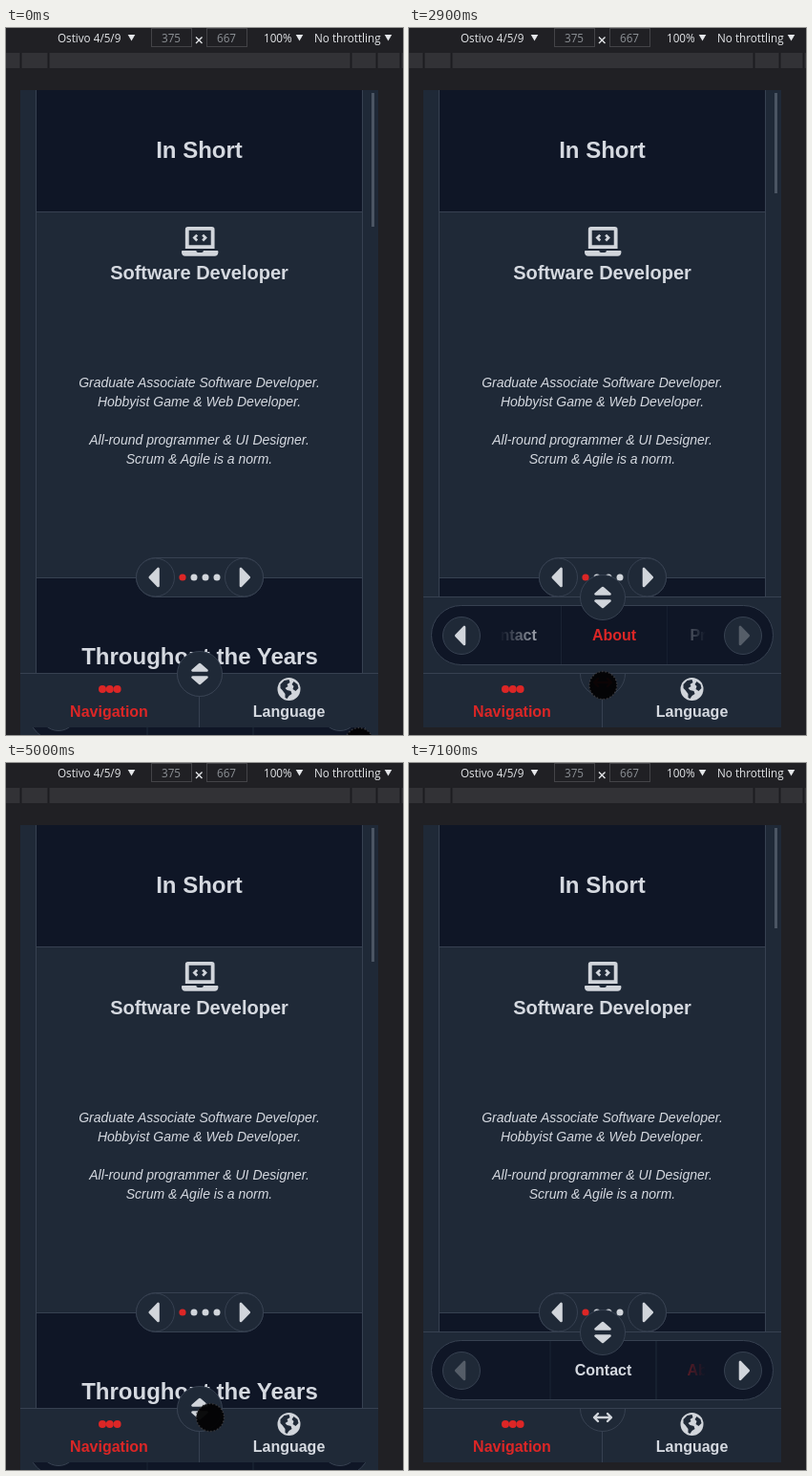
An HTML page for the animation above (7.2 s loop, 416 by 740 pixels).

```html
<!DOCTYPE html>
<html lang="en">
<head>
<meta charset="utf-8">
<title>Mobile navigation demo</title>
<style>
  html, body { margin: 0; width: 100%; height: 100%; overflow: hidden; background: #202024; }
  svg { display: block; font-family: "Liberation Sans", Arial, sans-serif; }
  text { fill: #d5d9e0; text-anchor: middle; }
  .tools text { font: 11.7px "Open Sans", "Noto Sans", sans-serif; fill: #e4e6e9; text-anchor: start; }
  .tools .size { fill: #8d9196; }
  .h1 { font: bold 24px "Liberation Sans", Arial, sans-serif; }
  .h2 { font: bold 20px "Liberation Sans", Arial, sans-serif; }
  .label { font: bold 16px "Liberation Sans", Arial, sans-serif; }
  .body { font: italic 14px "Liberation Sans", Arial, sans-serif; }
  .red { fill: #dc2626; }
  .light { fill: #d1d5db; }
  .dark { fill: #0f1626; }
  .slate { fill: #1f2937; }
  .edge { stroke: #374151; }
  .line { stroke: #374151; fill: none; }
  .tri { fill: #d1d5db; stroke: #d1d5db; stroke-width: 2.6; stroke-linejoin: round; }
</style>
</head>
<body>
<svg width="416" height="740" viewBox="0 0 416 740">
  <defs>
    <path id="caret" class="tri" d="M-4.7 0L4-9V9Z"/>
    <path id="drop" d="M-3.8-3H3.8L0 3.5Z" fill="#e4e6e9"/>
    <linearGradient id="fade" gradientUnits="userSpaceOnUse" x1="95" x2="311" y1="0" y2="0">
      <stop offset="0" stop-color="#000"/>
      <stop offset=".25" stop-color="#fff"/>
      <stop offset=".75" stop-color="#fff"/>
      <stop offset="1" stop-color="#000"/>
    </linearGradient>
    <mask id="edges" maskUnits="userSpaceOnUse" x="95" y="600" width="216" height="72">
      <rect x="95" y="600" width="216" height="72" fill="url(#fade)"/>
    </mask>
    <clipPath id="below"><rect x="170" y="676" width="66" height="40"/></clipPath>
  </defs>

  <!-- device toolbar -->
  <g class="tools">
    <text x="54" y="15">Ostivo 4/5/9</text>
    <rect class="line" x="152.5" y=".5" width="42" height="19" style="stroke:#434347"/>
    <text class="size" x="163" y="15">375</text>
    <path d="M199 9.500l6.500 6.500m0-6.500l-6.500 6.500" stroke="#e4e6e9" stroke-width="1.4"/>
    <rect class="line" x="210.500" y=".5" width="42" height="19" style="stroke:#434347"/>
    <text class="size" x="221" y="15">667</text>
    <text x="270" y="15">100%</text>
    <text x="323" y="15">No throttling</text>
    <use href="#drop" x="131.500" y="10"/><use href="#drop" x="307.500" y="10"/><use href="#drop" x="400.500" y="10"/>
    <rect y="26" width="416" height="16" fill="#323236"/>
    <path d="M15.500 26v16M44.500 26v16M361.500 26v16M388.500 26v16M413.500 26v16" stroke="#1c1c20" stroke-width="2"/>
  </g>

  <!-- page -->
  <rect class="slate" x="15" y="65" width="375" height="667"/>
  <path class="dark" d="M31 65H374V192H31ZM31 576H374V676H31Z"/>
  <path class="line" d="M31.500 65V676M373.500 65V676M31 192.500H374M31 575.500H374"/>
  <rect id="thumb" x="383" y="68" width="3" width="3" height="140" fill="#4b5563"/>
  <text class="h1" x="202.500" y="136">In Short</text>
  <g transform="translate(184 208) scale(.06)" class="light">
    <path fill-rule="evenodd" d="M64 384V48Q64 0 112 0H528Q576 0 576 48V384ZM128 64V320H512V64Z"/>
    <path d="M16 416H255Q258 448 288 448H350Q380 446 382 416H624Q640 416 640 432V448Q636 508 576 512H64Q4 508 0 448V432Q0 416 16 416Z"/>
    <path d="M271 143L222 192L271 241M369 143L418 192L369 241" fill="none" stroke="#d1d5db" stroke-width="44"/>
  </g>
  <text class="h2" x="202.500" y="263">Software Developer</text>
  <g class="body">
    <text x="202.500" y="376">Graduate Associate Software Developer.</text>
    <text x="202.500" y="396">Hobbyist Game &amp; Web Developer.</text>
    <text x="202.500" y="436">All-round programmer &amp; UI Designer.</text>
    <text x="202.500" y="456">Scrum &amp; Agile is a norm.</text>
  </g>
  <text class="h1" x="203" y="666">Throughout the Years</text>
  <g class="slate edge">
    <rect x="136.500" y="554.500" width="133" height="41" rx="20.500"/>
    <circle cx="156.500" cy="575" r="20"/><circle cx="249.500" cy="575" r="20"/>
  </g>
  <use href="#caret" x="155.500" y="575"/>
  <use href="#caret" transform="translate(250 575) scale(-1 1)"/>
  <circle class="red" cx="185" cy="575" r="3.600"/>
  <g class="light"><circle cx="197" cy="575" r="3.500"/><circle cx="209" cy="575" r="3.500"/><circle cx="221" cy="575" r="3.500"/></g>

  <!-- sliding panel -->
  <g id="panel">
    <rect class="slate" x="15" y="596" width="375" height="80"/>
    <path class="line" d="M15 595.500H390"/>
    <rect class="dark edge" x="23.500" y="604.500" width="358" height="62" rx="31"/>
    <g mask="url(#edges)"><g id="items" class="label"></g></g>
    <g class="slate edge"><circle cx="55" cy="636" r="19.500"/><circle cx="350" cy="636" r="19.500"/></g>
    <use id="prev" href="#caret" x="54" y="636"/>
    <use id="next" href="#caret" transform="translate(351 636) scale(-1 1)"/>
  </g>

  <!-- bottom bar -->
  <rect class="slate" x="15" y="676" width="375" height="56"/>
  <path class="line" d="M15 675.500H390M202.500 676V732"/>
  <g class="red"><circle cx="101" cy="692" r="4"/><circle cx="108.800" cy="692" r="4"/><circle cx="116.600" cy="692" r="4"/></g>
  <text class="label" x="108" y="721" style="fill:#dc2626">Navigation</text>
  <g transform="translate(296.500 692)">
    <circle class="light" r="12"/>
    <path class="slate" d="M-9-5L-5-9L0-10L1-7L-2-5L-1-3L-4-1L-2 1L2 2L3 5L0 7L-2 10L-4 9V5L-7 1L-9-1ZM5-8L9-5L10-1L7 2L4 0L5-3L3-5Z"/>
  </g>
  <text class="label" x="296.500" y="721">Language</text>
  <g clip-path="url(#below)">
    <circle class="slate edge" cx="203" cy="676" r="23.500"/>
    <path id="swipe" d="M196 685H210M198 681L194 685L198 689M208 681L212 685L208 689" fill="none" stroke-width="2.400" stroke-linejoin="round" stroke-linecap="round"/>
  </g>

  <g id="handle">
    <circle class="slate edge" r="23.500"/>
    <path class="tri" d="M-7.500-3.500H7.500L0-10ZM-7.500 3.500H7.500L0 10Z"/>
  </g>
  <circle id="cursor" r="14.500" fill="#030304" fill-opacity=".96" stroke="#38383c" stroke-width="1.500" stroke-dasharray="1.500 2"/>
</svg>
<script>
const LOOP = 7200, STEP = 111, TRAVEL = 80;
const $ = id => document.getElementById(id);

// Keys: [time, value]
const open = [[850, 0], [1080, 1], [4200, 1], [4450, 0], [5100, 0], [5350, 1], [5800, 1], [6050, 0], [6250, 0], [6480, 1]];
const scroll = [[1250, 111], [1850, 279], [2250, 279], [2400, 222], [2500, 222], [3250, 0]];
const cursorX = [[0, 370], [800, 222], [1250, 222], [1850, 390], [2500, 327], [3250, 103], [3800, 212], [4400, 212], [5000, 214], [5500, 213], [6200, 218], [6300, 218], [6550, 310]];
const cursorY = [[0, 747], [800, 690], [2450, 688], [3250, 688], [3800, 618], [4000, 606], [4400, 606], [5000, 685], [5150, 685], [5500, 606], [5850, 606], [6200, 680], [6300, 680], [6550, 708]];

function at(keys, t) {
  const i = keys.findIndex(k => k[0] > t);
  if (i === 0) return keys[0][1];
  if (i < 0) return keys[keys.length - 1][1];
  const [t0, a] = keys[i - 1], [t1, b] = keys[i];
  const u = (t - t0) / (t1 - t0);
  return a + (b - a) * u * u * (3 - 2 * u);
}

const within = (t, a, b) => t >= a && t < b;
const move = (id, x, y) => $(id).setAttribute("transform", `translate(${x} ${y})`);

$("items").innerHTML = ["Contact", "About", "Projects"].map((name, i) => {
  const x = 203.5 + i * STEP;
  const style = name === "About" ? ' style="fill:#dc2626"' : "";
  return `<path d="M${x - 55.5} 605V666M${x + 55.5} 605V666" stroke="#1b2434"/>` +
    `<text x="${x}" y="641"${style}>${name}</text>`;
}).join("");

function draw(now) {
  const t = now % LOOP, p = at(open, t);
  move("panel", 0, TRAVEL * (1 - p));
  move("handle", 203, 676 - TRAVEL * p);
  move("items", -at(scroll, t), 0);
  move("cursor", at(cursorX, t), at(cursorY, t));
  $("thumb").setAttribute("height", 140 - 35 * p);
  $("prev").setAttribute("opacity", t >= 3400 ? .3 : 1);
  $("next").setAttribute("opacity", within(t, 2300, 3400) ? .3 : 1);
  const dragging = within(t, 1200, 2250) || within(t, 2500, 3350);
  $("swipe").setAttribute("stroke", dragging ? "#dc2626" : "#d1d5db");
  const away = within(t, 1850, 2500) || t >= 6650;
  $("cursor").setAttribute("visibility", away ? "hidden" : "visible");
  requestAnimationFrame(() => draw(performance.now() - start));
}
const start = performance.now();
draw(0);
</script>
</body>
</html>
```
